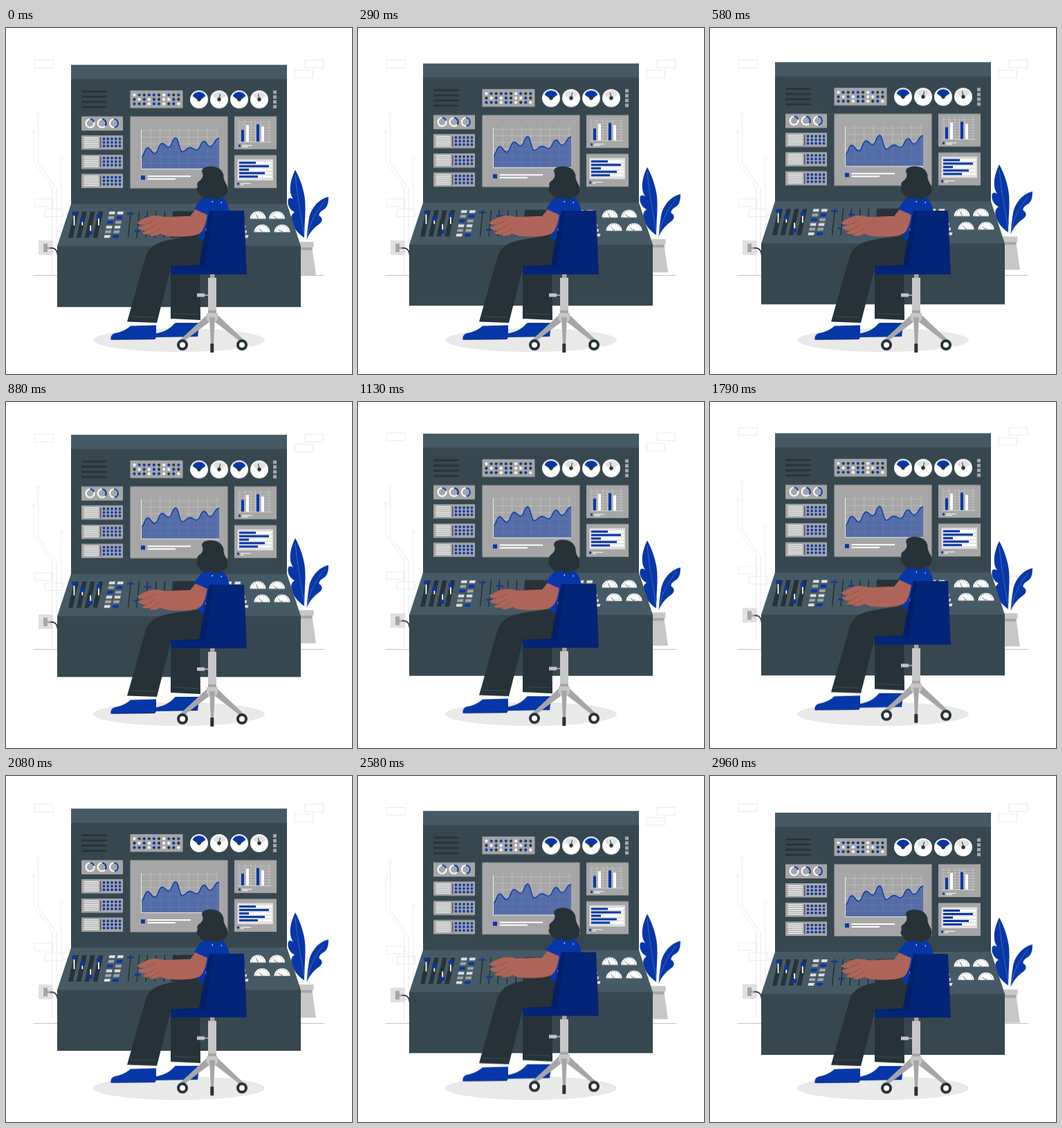
Write an HTML page that moves like this. It is 500 px wide and 500 px high and loops after 3 s.

```html
<!DOCTYPE html>
<html lang="en">
<head>
<meta charset="utf-8">
<title>Control room</title>
<style>
  html, body { margin: 0; width: 100%; height: 100%; overflow: hidden; background: #fff; }
  svg { display: block; width: 100vw; height: 100vh; }
  #circuits { animation: bob-late 3s linear infinite; }
  #plant { animation: bob 1.5s linear infinite; }
  #console { animation: bob 3s linear infinite; }
  #person { animation: rise-late 3s linear infinite; }
  @keyframes bob { 50% { transform: translateY(-10px); } }
  @keyframes bob-late {
    0%, 33.333% { transform: none; }
    58.333% { transform: translateY(-10px); }
    83.333% { transform: none; }
    100% { transform: translateY(-6.667px); }
  }
  @keyframes rise-late {
    0%, 33.333% { transform: none; }
    83.333% { transform: translateY(-10px); }
    100% { transform: translateY(-6.667px); }
  }
  .blue { fill: #0637a8; }
  .navy { fill: #022577; }
  .ink { fill: #263238; }
  .slate { fill: #37474f; }
  .steel { fill: #455a64; }
  .gray { fill: #a6a6a6; }
  .silver { fill: #c7c7c7; }
  .pale { fill: #e0e0e0; }
  .white { fill: #fff; }
  .skin { fill: #ae6459; }
  .line { fill: none; stroke: #fff; }
  .dark { fill: none; stroke: #263238; }
  .seam { fill: none; stroke: #455a64; stroke-width: .7; }
</style>
</head>
<body>
<svg viewBox="0 0 500 500" preserveAspectRatio="none">
  <path d="M40 357.500H460" stroke="#263238" stroke-width=".3"/>

  <g id="circuits">
    <g fill="none" stroke="#e8e8e8" stroke-width=".9">
      <path d="M41.500 46.500h26.500v11h-26.500zM432 46.500h26.500v11H432zM417.500 61h26v11h-26zM41.500 247h26v11h-26zM56.500 261.500h26v11h-26zM418 261.500h26v11h-26z"/>
      <path d="M46.500 127V195L73.500 232.500V318M40 152V193L66.500 230V355M80 191V298"/>
      <circle cx="46.500" cy="124.500" r="2.400"/>
      <circle cx="40" cy="149.500" r="2.400"/>
      <circle cx="80" cy="188.500" r="2.400"/>
    </g>
    <path class="pale" d="M47 307h21v21H47z"/>
    <path class="gray" d="M54 311.500h6v12.500h-6zM60 316.500h4v3h-4z"/>
    <path class="dark" stroke-width="1.800" d="M64 318C70 317.500 74 320 74.500 328"/>
  </g>

  <g id="plant">
    <path class="blue" d="M418 205C423 214 429 228 431.500 244C433.500 257 432 275 431.500 287L431 303L428 301C423 297 415 289 413 280C411 272 413 269 417 266C409 262 406 254 408 247C410 245 412 246 415 247C408 238 410 221 418 205Z"/>
    <path class="blue" d="M466 244C452 247 441 260 438 275C436 287 435 297 434.500 306C438 297 443 291 449 286C455 282 459 278 455 273C450 271 453 266 458 263C464 260 466 254 466 244Z"/>
    <path class="line" stroke-width=".4" opacity=".6" d="M418 212C421 245 428 280 432.500 309M460 251C446 267 437 286 434 309"/>
    <path class="silver" d="M426 315H442L448 357H426z"/>
    <path class="gray" d="M425 315H442L443 321H425z"/>
    <path class="silver" d="M423 309H444.500V317H423z"/>
  </g>

  <g transform="translate(0 .25)">
  <g id="console">
    <path class="slate" d="M94 73H406V255H94zM74 314.500H426V403H74z"/>
    <path class="steel" d="M94 53H406V73.500H94zM94 254H406L426 315H74z"/>
    <path class="dark" stroke-width="2.600" d="M109 91.500h37M109 99h37M109 106.500h37M109 114h37"/>
    <path class="gray" d="M179.500 90h76v25.500h-76zM109 127.500h60V148h-60zM109 155h60v20.500h-60zM109 183h60v20.500h-60zM109 210.500h60V231h-60zM179.500 127.500h141v104h-141zM330 127.500h61V175h-61zM330 183.500h61V231h-61z"/>
    <path class="gray" d="M386 90h5v5h-5zM386 97h5v5h-5zM386 104h5v5h-5zM386 111h5v5h-5z"/>
    <g id="leds"></g>
    <g id="dials"></g>
    <g id="rings"></g>
    <g id="racks"></g>

    <!-- area chart -->
    <g id="grid" class="line" stroke-width=".5" opacity=".45"></g>
    <path id="area" class="blue" opacity=".5"/>
    <path id="curve" fill="none" stroke="#0637a8" stroke-width="1.400"/>
    <path class="line" stroke-width=".8" d="M195.500 146V203.500H308"/>
    <path class="blue" d="M195 213h6v6h-6z"/>
    <path class="line" stroke-width="1.800" d="M204.500 214H267M204.500 218H245"/>

    <!-- bar charts -->
    <path class="line" stroke-width=".4" opacity=".65" d="M335 136h48M335 140h48M335 144h48M335 148h48M335 152h48M335 156h48M335 160h48M337 132V164M345.500 132V164M354 132V164M360 132V164M368 132V164M380 132V164"/>
    <path class="line" stroke-width=".6" d="M335 164.300H383"/>
    <path class="blue" d="M340 147h4v17h-4zM362 139h4v25h-4zM336 168.500h3v3h-3z"/>
    <path class="white" d="M347 140h4v24h-4zM369 142h4v22h-4z"/>
    <path class="line" stroke-width="1" d="M341 169.500h15M341 171.500h9M339 224.500h15M339 226.500h4.500"/>
    <path class="pale" d="M334.500 189.500H386V220H334.500z"/>
    <g id="meters"></g>
    <path class="blue" d="M334 223.500h3v3h-3z"/>

    <!-- desk controls -->
    <g id="faders"></g>
    <g id="keys"></g>
    <path class="dark" stroke-width="1.600" d="M180.500 264.500L176.500 303M192.500 264.500L189 303M204.500 264.500L202 303M217 264.500L215 303M229.500 264.500L228 303"/>
    <path class="blue" d="M175 267h10v2.200h-10zM200 272h9.500v2.200H200zM185 292h9.500v2.200H185z"/>
    <path class="ink" d="M241 264.500H306V303H238z"/>
    <g id="gauges"></g>
  </g>
  </g>

  <ellipse cx="250" cy="451" rx="124" ry="17" fill="#e9e9e9"/>

  <g id="person">
    <!-- far leg -->
    <path class="white" d="M243 420h36v9h-36z"/>
    <path class="blue" d="M216 447V441.500C227 440 238 434 243 427.500L245 426H279.500L277 446z"/>
    <path class="ink" d="M238 338H280L281 422L238 420z"/>
    <path class="seam" d="M243 412.500L278 414"/>

    <!-- near leg -->
    <path class="white" d="M181 424h36v8h-36z"/>
    <path class="blue" d="M151.500 450.500C151 445 153 442.500 158 441C168 439 175 435 180 430.500L217 429.500V447L215 450z"/>
    <path d="M152 450L215 449.500" stroke="#022577" stroke-width=".8"/>
    <path class="ink" d="M290 298C270 302 249 303 232 307C214 311 205 319 201.500 331L175 424.500L218 426L238.500 345H292z"/>
    <path class="seam" d="M180 417L215 418"/>

    <!-- torso and arm -->
    <path class="blue" d="M286 244L314 245C320 252 323 260 323 270L317 306H281C275 296 276 284 280 273z"/>
    <path class="white" d="M284 279l1.500 3-2 1zM288 290l2 2-2 1zM282 291l2 1-1.500 2z"/>
    <path class="skin" d="M274 262L291 269C289 281 287 290 281 296C275 300.500 262 301.500 248 301.500C238 301.500 230 301 223 297C219 300 211 302 207 299L212 296C206 299 199 299 197 296L204 292C198 294 192 291 190 288L202 284C196 285 191 284 189.500 281C197 276 205 272 213 271C222 271 228 274 237 273C250 272 259 272 266 272z"/>
    <path d="M204 292L217 285M212 296L222 290M202 284L215 278" fill="none" stroke="#8e4b43" stroke-width=".7"/>
    <path class="blue" d="M272 261.500C277 253 282 246 289 243.500L307 245C300 254 295 262 291 270z"/>
    <path class="ink" d="M283 207C283 202 290 199.500 297 200C306 200 313 205 314.500 213C314 219 317 223 319.500 228C322 237 319 243 312 244C307 248 300 248.500 295 245.500C289 247 281 245 280 240C276 237 274 233 277 229C275 225 277 222 281 220C284 216 286 214 283 207Z"/>
    <path class="white" d="M297 251l1.800-1.200 0 2.600zM310 252l1.500-1 .5 2.600z"/>

    <!-- chair -->
    <path class="gray" d="M295 356h6.500v6H295z"/>
    <path class="navy" d="M294 264H344L348 356H238V344.500L279 343z"/>
    <path d="M294 264H299L288 345H238V344.500L279 343z" fill="#022068"/>
    <path class="gray" d="M290 415L250 452L254 455L295 424zM306 415L345 452L341 455L301 424zM294 418H302L300 457H296z"/>
    <path class="silver" d="M292 361h12v47h-12zM290 412h16v9l-4 5v-8h-8v8l-4-5zM276 383.500h11v5h-11z"/>
    <path class="gray" d="M292 408h12v4h-12zM287 385h5v2h-5z"/>
    <g fill="#fff" stroke="#263238" stroke-width="4">
      <circle cx="255" cy="458" r="6"/>
      <circle cx="341" cy="458" r="6"/>
    </g>
    <rect class="ink" x="295.300" y="456" width="5" height="13" rx="1"/>
  </g>
</svg>
<script>
  const fill = (id, markup) => document.getElementById(id).innerHTML = markup;
  const list = (n, fn) => Array.from({ length: n }, (_, i) => fn(i)).join('');
  const dot = (x, y, r, cls) => `<circle class="${cls}" cx="${x}" cy="${y}" r="${r}"/>`;
  const box = (x, y, w, h, cls) => `<rect class="${cls}" x="${x}" y="${y}" width="${w}" height="${h}"/>`;
  const path = (cls, d, width = 1) => `<path class="${cls}" d="${d}" stroke-width="${width}"/>`;
  const tone = { w: 'white', b: 'blue', d: 'ink', p: 'pale', g: 'gray' };

  fill('leds', ['wbdbbdwbdb', 'dwbwbdwwbd', 'bbdwbbwdbw'].map((row, r) =>
    list(10, i => dot(185.5 + i * 7.1, 96.5 + r * 6.4, 2.1, tone[row[i]]))).join(''));

  fill('dials', list(4, i => {
    const x = 279 + i * 29, odd = i % 2;
    const needle = odd ? path('dark', `M${x} 103L${x + (i > 1 ? -1.5 : 1.5)} 95`) : '';
    return dot(x, 103, 13, 'white') +
      path(odd ? 'pale' : 'blue', `M${x} 105L${x - 9.5} 98A10.500 10.500 0 0 1 ${x + 9.5} 98Z`, 0) +
      needle + dot(x, 103, 2.7, 'ink');
  }));

  fill('rings', [0.2, 0.36, 0.48].map((part, i) => {
    const x = 121.5 + i * 17.2, a = part * 2 * Math.PI;
    const end = `${x + 6 * Math.sin(a)} ${137.5 - 6 * Math.cos(a)}`;
    return `<circle class="line" stroke-width="2.200" cx="${x}" cy="137.500" r="6"/>` +
      `<path d="M${x} 131.500A6 6 0 0 1 ${end}" fill="none" stroke="#0637a8" stroke-width="2.200"/>`;
  }).join(''));

  fill('racks', list(3, r => {
    const y = 155 + r * 27.7;
    return list(6, i => path('line', `M112.500 ${y + 3.5 + i * 2.7}h21.500`, 1.2)) +
      path('dark', `M136.800 ${y + 3}v15`) +
      list(15, i => dot(141.5 + i % 5 * 5.75, y + 5 + Math.floor(i / 5) * 5.1, 1.9, 'blue'));
  }));

  fill('grid', list(8, i => path('', `M${209 + i * 13.7} 143V203`, .5)) +
    list(6, i => path('', `M195 ${148 + i * 9.5}H308`, .5)));

  const points = [[195.5, 186], [204.5, 173], [215, 181], [225.5, 166.5], [235, 172],
    [245.3, 158.5], [254.5, 178.5], [266, 172.5], [275.5, 176], [286.3, 163.5], [294.5, 171], [308, 159]];
  const curve = points.reduce((d, [x, y], i) => {
    if (!i) return `M${x} ${y}`;
    const [px, py] = points[i - 1], mid = (px + x) / 2;
    return `${d}C${mid} ${py} ${mid} ${y} ${x} ${y}`;
  }, '');
  document.getElementById('curve').setAttribute('d', curve);
  document.getElementById('area').setAttribute('d', curve + 'V203H195.500Z');

  fill('meters', [24, 43, 14, 37, 27].map((w, i) => {
    const y = 193 + i * 5;
    return box(337, y, 47, 3, 'white') + box(337, y, w, 3, 'blue');
  }).join(''));

  fill('faders', [[268, 285], [277, 285], [296, 285], [272, 285]].map(([knob, end], i) => {
    const x = 98.5 + i * 11.8;
    return path('ink', `M${x} 265h6.500l-8.500 38h-6.500z`, 0) +
      path('line', `M${x} ${knob}V${end}`, 1.8) +
      `<rect class="blue" x="${x - 3}" y="${knob - 3}" width="6" height="6" rx="1.500"/>`;
  }).join(''));

  const keys = (x, step, colors) => [...colors].map((c, i) =>
    path(tone[c], `M${x + i * step} ${265 + i * 6.8}h8.500l-1 4h-8.500z`, 0)).join('');
  fill('keys', keys(149.5, -1.4, 'pgbpgp') + keys(161.5, -1.4, 'pbgpgb') +
    keys(318, 2, 'pgbpgp') + keys(331, 2.2, 'pbgppp'));

  fill('gauges', [[364, 275.5, 70], [391.5, 275.5, 40], [370, 294.7, 50], [399, 294.7, 35]].map(([x, y, deg]) => {
    const a = deg * Math.PI / 180;
    return path('white', `M${x - 11.5} ${y}A11.500 11 0 0 1 ${x + 11.5} ${y}Z`, 0) +
      `<path class="dark" d="M${x - 9} ${y - 1}A9 8.500 0 0 1 ${x + 9} ${y - 1}" stroke-width="1.200" stroke-dasharray=".6 2.600"/>` +
      path('dark', `M${x} ${y}L${x - 7 * Math.cos(a)} ${y - 7 * Math.sin(a)}`, .7) +
      dot(x, y - 1, 1.1, 'gray');
  }).join(''));
</script>
</body>
</html>
```
